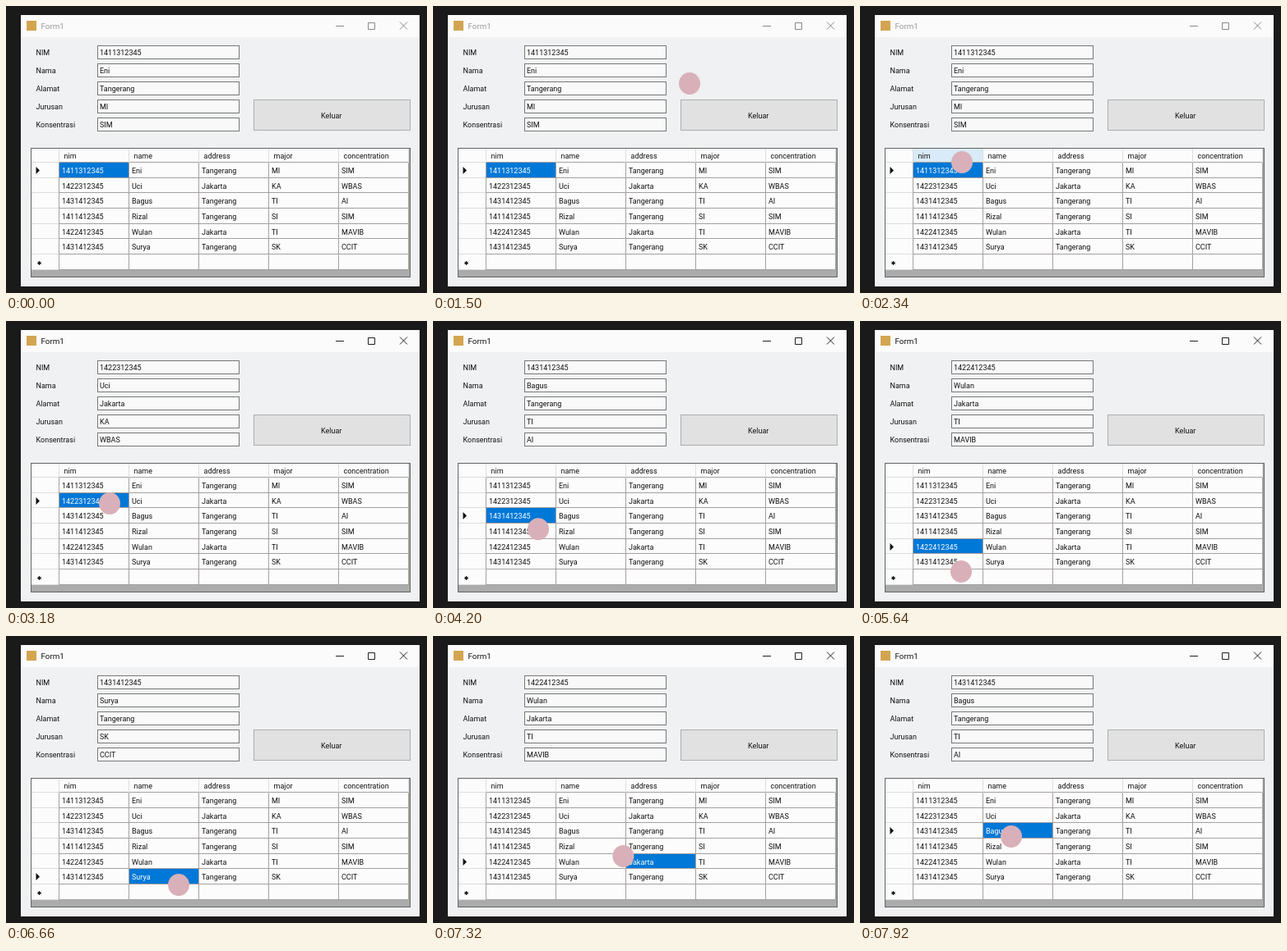
An HTML page that plays this animation: 512 by 350 pixels, repeating every 8000 ms.

```html
<!DOCTYPE html>
<html>
<head>
<meta charset="utf-8">
<style>
html, body { margin: 0; width: 100%; height: 100%; overflow: hidden; background: #1a1a1a; }
svg { display: block; font: 9px Roboto, "Open Sans", sans-serif; }
</style>
</head>
<body>
<svg id="stage" width="512" height="350" viewBox="0 0 512 350"></svg>
<script>
const stage = document.getElementById('stage');
const rows = [
  ['1411312345', 'Eni', 'Tangerang', 'MI', 'SIM'],
  ['1422312345', 'Uci', 'Jakarta', 'KA', 'WBAS'],
  ['1431412345', 'Bagus', 'Tangerang', 'TI', 'AI'],
  ['1411412345', 'Rizal', 'Tangerang', 'SI', 'SIM'],
  ['1422412345', 'Wulan', 'Jakarta', 'TI', 'MAVIB'],
  ['1431412345', 'Surya', 'Tangerang', 'SK', 'CCIT']
];
const labels = ['NIM', 'Nama', 'Alamat', 'Jurusan', 'Konsentrasi'];
const heads = ['nim', 'name', 'address', 'major', 'concentration'];

// Pointer path: time, x, y
const path = [
  [720, 512, 50], [1080, 370, 70], [1200, 370, 70], [1500, 299, 81], [1620, 250, 85],
  [2040, 112, 49], [2340, 111, 177], [2700, 113, 209], [3360, 113, 209], [3720, 114, 236],
  [4140, 115, 236], [4440, 115, 257], [4800, 115, 257], [5040, 110, 271], [5340, 110, 271],
  [5640, 110, 292], [5820, 109, 296], [5940, 109, 296], [6000, 107, 296], [6120, 107, 296],
  [6420, 197, 290], [6660, 197, 290], [6900, 250, 271], [7080, 250, 271], [7680, 171, 231],
  [8000, 171, 231]
];
// Selections: time, row, column
const clicks = [
  [0, 0, 0], [3000, 1, 0], [3780, 2, 0], [4620, 3, 0], [5040, 4, 0],
  [5760, 5, 0], [6420, 5, 1], [6900, 4, 2], [7740, 2, 1]
];
const ACTIVE = 3000, LOOP = 8000, STEP = 60;

function add(tag, attrs, text) {
  const el = document.createElementNS('http://www.w3.org/2000/svg', tag);
  for (const k in attrs) el.setAttribute(k, attrs[k]);
  if (text !== undefined) el.textContent = text;
  return stage.appendChild(el);
}
const box = (x, y, width, height, fill, stroke = 'none') =>
  add('rect', { x, y, width, height, fill, stroke });
const label = (x, y, text) => add('text', { x, y, fill: '#111' }, text);
const line = (d, stroke) => add('path', { d, stroke, fill: 'none' });
const colX = c => 65 + 85 * c;
const rowY = r => Math.round(191 + 18.66 * r);

// Window
box(18, 11, 485, 331, '#f0f1f2');
box(18, 11, 485, 27, '#fbfbfb');
box(25, 18, 12, 12, '#d3a550');
const title = label(42.5, 27.5, 'Form1');
title.setAttribute('font-size', 9.8);
const buttons = line('M401 24.5h10M440.5 20.5h8v8h-8zM479 19.5l9 9m0-9l-9 9');

// Form
const fields = labels.map((name, i) => {
  const y = 48 + 22 * i;
  label(36.5, y + 11.5, name);
  box(111.5, y + .5, 172, 16, '#f9f9f9', '#777');
  return label(114, y + 11.5, '');
});
box(301.5, 114.5, 190, 37, '#e1e1e1', '#adadad');
label(383, 136.5, 'Keluar');

// Grid
box(30.5, 173.5, 461, 157, '#ababab', '#646464');
box(31, 174, 459, 148, '#fcfcfc');
const hover = box(65, 174, 85, 17, '#d9ebf9');
const mark = box(0, 0, 85, 18, '#0078d7');
for (let r = 0; r < 8; r++) line(`M31 ${rowY(r) - .5}h34`, '#ddd');
for (let r = 0; r < 8; r++) line(`M65 ${rowY(r) - .5}h425`, '#a5a0a0');
for (let c = 0; c < 6; c++) {
  line(`M${colX(c) - .5} 174v17`, '#ddd');
  line(`M${colX(c) - .5} 191v131`, '#a5a0a0');
}
heads.forEach((name, c) => label(colX(c) + 5.5, 186, name));
const cells = rows.map((row, r) =>
  row.map((text, c) => label(colX(c) + 3, rowY(r) + 13, text)));
const arrow = add('path', { d: 'M0 -4.5L4.5 0L0 4.5z', fill: '#111' });
line('M38 313.5h5M40.5 311v5M38.7 311.7l3.6 3.6m0-3.6l-3.6 3.6', '#222');

const pointer = add('ellipse', { rx: 13, ry: 13.5, fill: '#d9b0b9' });

function pointerAt(t) {
  const i = Math.max(1, path.findIndex(p => p[0] >= t));
  const a = path[i - 1], b = path[i];
  const k = (t - a[0]) / (b[0] - a[0]);
  return [a[1] + (b[1] - a[1]) * k, a[2] + (b[2] - a[2]) * k];
}

function draw(t) {
  const [, row, col] = clicks.filter(c => c[0] <= t).pop();
  const active = t >= ACTIVE;
  title.setAttribute('fill', active ? '#111' : '#999');
  buttons.setAttribute('stroke', active ? '#222' : '#888');

  fields.forEach((f, i) => f.textContent = rows[row][i]);
  cells.forEach((line, r) => line.forEach((cell, c) =>
    cell.setAttribute('fill', r === row && c === col ? '#fff' : '#111')));
  mark.setAttribute('x', colX(col));
  mark.setAttribute('y', rowY(row));
  arrow.setAttribute('transform', `translate(36.5 ${rowY(row) + 9.5})`);

  const [x, y] = pointerAt(t);
  const over = t > 720 && x > 65 && x < 150 && y >= 174 && y < 191;
  hover.setAttribute('visibility', over ? 'visible' : 'hidden');
  pointer.setAttribute('visibility', t > 720 ? 'visible' : 'hidden');
  pointer.setAttribute('cx', x + 13);
  pointer.setAttribute('cy', y + 13.5);
}

const start = performance.now();
function tick() {
  const t = (performance.now() - start) % LOOP;
  draw(Math.min(7920, Math.floor(t / STEP) * STEP));
  requestAnimationFrame(tick);
}
tick();
</script>
</body>
</html>
```
